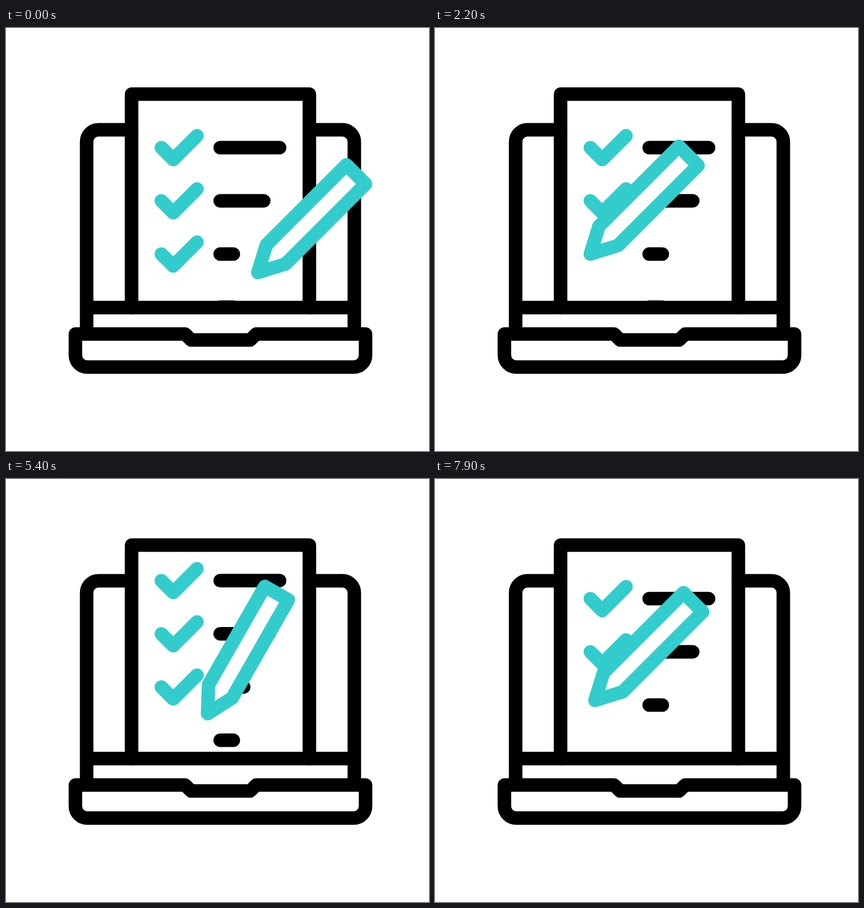
Animation, 640 px wide and 640 px high, one loop 8000 ms. Source, as an HTML page with a canvas:

```html
<!DOCTYPE html>
<html lang="en">
<head>
<meta charset="utf-8">
<title>Checklist on a laptop</title>
<style>
  html, body { margin: 0; width: 100%; height: 100%; overflow: hidden; background: #fff; }
  canvas { display: block; width: 100vw; height: 100vh; object-fit: contain; }
</style>
</head>
<body>
<canvas id="stage" width="640" height="640"></canvas>
<script>
const ctx = document.getElementById('stage').getContext('2d');
const LOOP = 8000, STEP = 100;
const BLACK = '#000', TEAL = '#33cccc';
const ROW_GAP = 80.5, ROW_TOP = 181;
const ROW_EXIT = -0.35; // a row leaves the list once it is this far above the top slot
const BAR_ENDS = [414, 414, 390, 344, 344]; // one slot above the list to one below

const LAPTOP = new Path2D(
  'M190 154H140A18 18 0 0 0 122 172V463 M459 154H509A18 18 0 0 1 527 172V463 M122 423H527' +
  'M105 463H271L280 472H369.5L378.5 463H544V495A18 18 0 0 1 526 513H123A18 18 0 0 1 105 495Z');
const PAPER = new Path2D('M190 423V100H459V423');
// Pencil outline, measured from its tip
const PENCIL = new Path2D('M0 0L13 -42L134 -163L163 -134L42 -13Z');

// Pencil after the third tick: time, x, y, turn in degrees
const RETURN = [
  [4500, 289, 326, 17.6],
  [5400, 305, 355, 15.2],
  [6200, 315, 370, 9.8],
  [7000, 290, 366, 4.8],
  [7900, 242, 335, 0],
  [8150, 235, 341, 0]
];

const clamp = v => Math.min(1, Math.max(0, v));
const mix = (a, b, u) => a + (b - a) * u;
const span = (t, a, b) => clamp((t - a) / (b - a));
const smooth = u => u * u * (3 - 2 * u);
const ease = (t, a, b) => smooth(span(t, a, b));

function spline(keys, t) {
  let i = 0;
  while (i < keys.length - 2 && t > keys[i + 1][0]) i++;
  const a = keys[i], b = keys[i + 1], len = b[0] - a[0];
  const u = clamp((t - a[0]) / len);
  const slope = (k, c) => {
    if (k === 0 || k === keys.length - 1) return 0;
    const p = keys[k - 1], n = keys[k + 1];
    return (n[c] - p[c]) / (n[0] - p[0]) * len;
  };
  return [1, 2, 3].map(c => mix(a[c], b[c], smooth(u)) +
    u * (1 - u) * (1 - u) * slope(i, c) - u * u * (1 - u) * slope(i + 1, c));
}

// Points of a tick drawn up to the given share of its length
function tick(y, share) {
  const short = 18, long = 36, d = (short + long) * share;
  const a = Math.min(d, short);
  const pts = [[235, y], [235 + a, y + a]];
  if (d > short) pts.push([235 + d, y + 2 * short - d]);
  return pts;
}

function line(pts, color) {
  ctx.strokeStyle = color;
  ctx.beginPath();
  pts.forEach(p => ctx.lineTo(p[0], p[1]));
  ctx.stroke();
}

function writing(t) {
  const u = span(t, 2400, 4500);
  return 0.6 * smooth(u) + 0.4 * u;
}

function pencilPose(t) {
  if (t < 2400) {
    const u = ease(t, 800, 1960);
    return [mix(381, 235, u), mix(370, 342, u), 0];
  }
  if (t < 4500) {
    const [x, y] = tick(ROW_TOP + 2 * ROW_GAP, writing(t)).pop();
    const lean = ease(t, 2500, 4500);
    return [x, y + 2 * lean, 17.6 * lean];
  }
  return spline(RETURN, t);
}

function drawRows(t) {
  const scroll = ease(t, 600, 1980) + ease(t, 4790, 6350);
  for (let i = 0; i < 5; i++) {
    const pos = i - scroll;
    if (pos < ROW_EXIT || pos > 3) continue;
    const y = ROW_TOP + pos * ROW_GAP;
    const slot = Math.min(3, Math.floor(pos + 1));
    const end = mix(BAR_ENDS[slot], BAR_ENDS[slot + 1], pos + 1 - slot);
    line([[324, y], [end, y]], BLACK);
    const share = i < 3 ? 1 : i === 3 ? writing(t) : 0;
    if (share > 0) line(tick(y, share), TEAL);
  }
}

function drawPencil(t) {
  const [x, y, turn] = pencilPose(t);
  ctx.save();
  ctx.translate(x, y);
  ctx.rotate(-turn * Math.PI / 180);
  ctx.fillStyle = '#fff';
  ctx.fill(PENCIL);
  ctx.strokeStyle = TEAL;
  ctx.stroke(PENCIL);
  ctx.restore();
}

function draw(t) {
  ctx.fillStyle = '#fff';
  ctx.fillRect(0, 0, 640, 640);
  ctx.lineWidth = 20.5;
  ctx.lineJoin = ctx.lineCap = 'round';
  drawRows(t);
  ctx.strokeStyle = BLACK;
  ctx.stroke(PAPER);
  ctx.stroke(LAPTOP);
  drawPencil(t);
}

const start = performance.now();
function frame(now) {
  const t = Math.max(0, now - start) % LOOP;
  draw(Math.floor(t / STEP) * STEP);
  requestAnimationFrame(frame);
}
draw(0);
requestAnimationFrame(frame);
</script>
</body>
</html>
```
